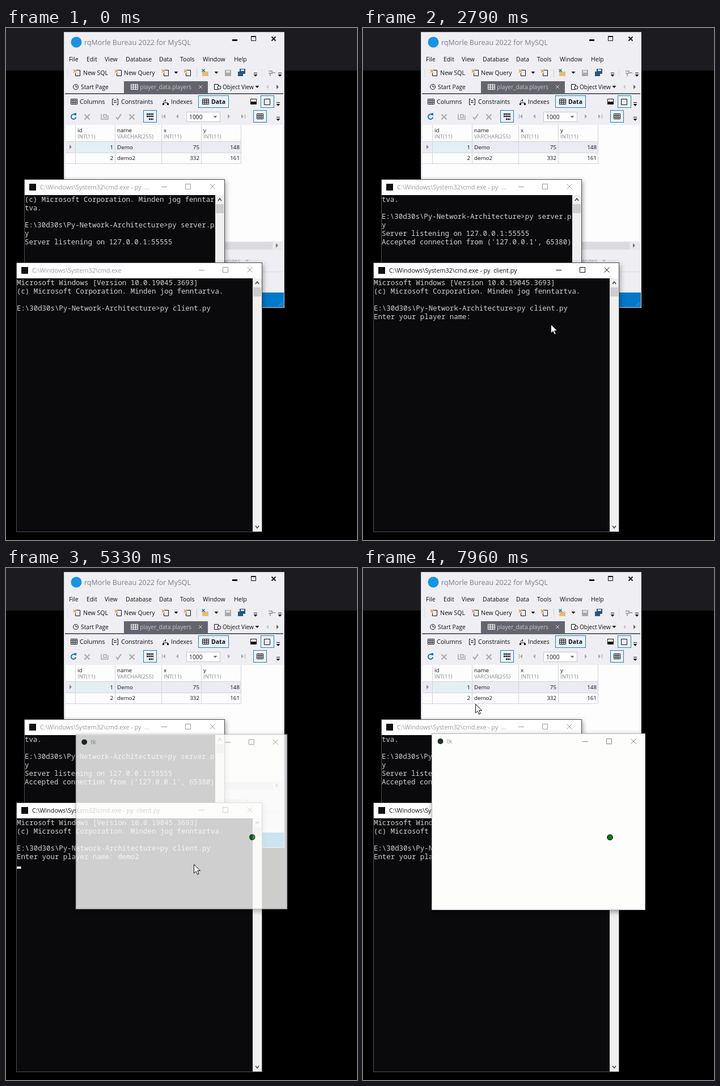
An HTML page for the animation above (8000 ms loop, 619 by 904 pixels).

```html
<!DOCTYPE html>
<html lang="en">
<head>
<meta charset="utf-8">
<title>Client and server</title>
<style>
html, body { margin: 0; width: 100%; height: 100%; overflow: hidden; background: #000; }
svg { display: block; }
text { font-family: "Open Sans", sans-serif; white-space: pre; }
.mono { font: 12.4px "Noto Sans Mono", monospace; fill: #d2d2d2; }
.shadow { filter: drop-shadow(1px 3px 5px #0006); }
</style>
</head>
<body>
<svg id="stage" width="619" height="904" viewBox="0 0 619 904"></svg>
<script>
const INK = '#111114', GREY = '#a9a9ad', BLUE = '#0a6fae', BAR = '#eeeef3', ORANGE = '#d9902a';
const CELL = 7.44;
const stage = document.getElementById('stage');

// Markup helpers
const rect = (x, y, w, h, fill, stroke) => stroke
  ? `<rect x="${x + .5}" y="${y + .5}" width="${w - 1}" height="${h - 1}" fill="${fill}" stroke="${stroke}"/>`
  : `<rect x="${x}" y="${y}" width="${w}" height="${h}" fill="${fill}"/>`;
const text = (x, y, s, size = 10.4, fill = INK, extra = '') =>
  `<text x="${x}" y="${y}" font-size="${size}" fill="${fill}" ${extra}>${s}</text>`;
const mono = (x, y, s, id = '') => `<text class="mono" x="${x}" y="${y}" ${id && `id="${id}"`}>${s}</text>`;
const line = (d, stroke = INK, w = 1, dash = 'none') =>
  `<path d="${d}" fill="none" stroke="${stroke}" stroke-width="${w}" stroke-dasharray="${dash}"/>`;
const shape = (d, fill = INK) => `<path d="${d}" fill="${fill}"/>`;
const disc = (x, y, r, fill, extra = '') => `<circle cx="${x}" cy="${y}" r="${r}" fill="${fill}" ${extra}/>`;
const down = (x, y, fill) => shape(`M${x - 3.5} ${y - 2}h7l-3.5 4z`, fill);
const side = (x, y, dir, fill = GREY) => shape(`M${x - 2 * dir} ${y - 4}v8l${4 * dir} -4z`, fill);
const cross = (x, y, r, c, w) => line(`M${x - r} ${y - r}l${2 * r} ${2 * r}m0 ${-2 * r}l${-2 * r} ${2 * r}`, c, w);
const overflow = (x, y) => rect(x - 3, y - 3, 6, 1, INK) + down(x, y + 2);
const grid = (x, y, w, h, c = INK) =>
  line(`M${x} ${y}h${w}v${h}h${-w}zM${x} ${y + h / 3}h${w}m0 ${h / 3}h${-w}M${x + w / 3} ${y}v${h}m${w / 3} 0v${-h}`, c);
const newDoc = x => line(`M${x + 5} 74.5h6.5v10h-8v-5`) + cross(x + 2.5, 76, 2.5, ORANGE, 1.3);
const chosen = (x, y, w) => rect(x, y, w, 22, '#e9f1fa', '#2b7fa2');
const grip = x => line(`M${x} 73v14`, '#b8b8c4', 1, '1 2');
const shadowed = markup => `<g class="shadow">${markup}</g>`;

function captionButtons(x, y, color) {
  return line(`M${x} ${y + .5}h10M${x + 42.5} ${y - 4.5}h9v9h-9z`, color) + cross(x + 90, y, 4.5, color);
}

function scrollbar(x, y, h) {
  const arrow = (cy, d) => line(`M${x + 5} ${cy + 2 * d}l3 ${-4 * d}l3 ${4 * d}`, '#444', 1.5);
  return rect(x, y, 16, h, '#f0f0f0') + rect(x + 1, y + 16, 14, 16, '#cdcdcd') + arrow(y + 8, 1) + arrow(y + h - 8, -1);
}

function consoleWindow(x, y, w, h, caption, name) {
  return shadowed(rect(x, y, w, h, '#0a0a0c', '#505056')) + rect(x + 1, y + 1, w - 2, 27, '#fff') +
    rect(x + 9, y + 8, 12, 12, '#111') +
    text(x + 28, y + 17.5, caption, 10.75, '#999', `id="${name}Title"`) +
    `<g id="${name}Buttons">${captionButtons(x + w - 112, y + 13, '#999')}</g>` +
    scrollbar(x + w - 17, y + 28, h - 29);
}

function databaseWindow() {
  const menu = [['File', 111], ['Edit', 142], ['View', 174], ['Database', 211], ['Data', 270],
    ['Tools', 307], ['Window', 347], ['Help', 402]];
  const columns = [['id', 'INT(11)', 123], ['name', 'VARCHAR(255)', 193], ['x', 'INT(11)', 275], ['y', 'INT(11)', 345]];
  const rows = [[1, 'Demo', 75, 148], [2, 'demo2', 332, 161]];
  const right = 'text-anchor="end"';

  const frame = rect(102, 7, 389, 487, BAR, '#d4d4e2') +
    disc(124, 25, 9.5, '#1893e2') + text(138, 29.5, 'rqMorle Bureau 2022 for MySQL', 12.5, '#808086') +
    rect(399, 20, 9, 3, INK) + line('M432.5 14.5h8v8h-8zM432 15.5h9') + cross(472, 19, 3.5, INK, 1.8) +
    menu.map(([s, x]) => text(x, 59, s, 10.5)).join('');

  const toolbar = grip(108.5) + newDoc(119) + text(136, 83, 'New SQL', 10.5) +
    newDoc(192) + text(208, 83, 'New Query', 10.5) + newDoc(275) + down(300, 79) + newDoc(314) +
    line('M336.5 72v15', '#ccccd6') +
    shape('M346 75h5l1 2h5v8h-11z', '#e5bd72') + cross(348, 75, 2.5, BLUE, 1.2) + down(371, 79) +
    shape('M386 74h11v11h-11z', GREY) + rect(388, 75, 7, 4, '#ddd') +
    shape('M412 72h10v9h-10zM409 77h9v8h-9z', '#27587e') + rect(414, 73, 6, 3, '#dde') +
    overflow(440, 82) + grip(451.5) + line('M463 76h6v4h-6m6 -1h6M466 80v5', GREY, 2) + overflow(483, 82);

  const tabs = rect(208, 94, 148, 22, '#64646e') + rect(104, 115, 385, 2, '#64646e') +
    disc(123, 104, 4.5, 'none', `stroke="${INK}"`) + line('M123 101v3h3') + text(132, 108, 'Start Page', 10.3) +
    grid(220.5, 99.5, 12, 9, '#fff') + text(236, 108, 'player_data.players', 10.05, '#c6c6ce') +
    cross(343, 104, 3, '#d2d2da') +
    line('M367.5 99.5h7v9h-7z') + disc(376, 105, 3, BAR, `stroke="${INK}"`) + text(382, 108, 'Object View', 10.05) +
    down(443, 104) + side(461, 104, -1, '#c8c8d0') + side(479, 104, 1, '#666');

  const views = grid(114.5, 125.5, 11, 9) + text(130, 134, 'Columns', 10.8) +
    line('M190 125.5h-2.5v10h2.5m5 -10h2.5v10h-2.5M190 128.5h5m0 3h-5') + text(203, 134, 'Constraints', 10.6) +
    line('M281.5 126v4m-4 5v-3h8v3m-8 -5l4 -3') + rect(276, 133, 3, 3, INK) + rect(284, 133, 3, 3, INK) +
    text(291, 134, 'Indexes', 10.5) +
    chosen(339, 119, 54) + grid(346.5, 125.5, 11, 9) + text(362, 134, 'Data', 10.5, INK, 'font-weight="700"') +
    rect(431, 125, 11, 10, '#fff', INK) + rect(431, 130, 11, 5, INK) +
    chosen(449, 119, 24) + line('M455.5 125.5h10v10h-10z') + overflow(480, 134);

  const tools = line('M122 153.5a4.3 4.3 0 1 0 1.3 4', BLUE, 1.8) + shape('M119 151l5 -1v5z', BLUE) +
    cross(143, 157, 4.5, GREY, 2) + line('M168 152v9h12v-7m-8 -1h5v5h-5z', GREY, 1.5) +
    line('M194 157l3 4l6 -9', GREY, 2) + cross(222, 157, 4.5, GREY, 2) +
    chosen(242, 145, 24) + line('M248 152h12M248 156h12M252 161h8', INK, 2.4, '2.6 .7') +
    side(279, 156, -1) + line('M275.5 152v8', GREY) + side(302, 156, -1) +
    rect(318, 148, 60, 18, '#fff', '#c6c6d0') + text(323, 160.5, '1000', 10.3) + down(369, 157, '#777') +
    side(393, 156, 1) + side(417, 156, 1) + line('M421.5 152v8', GREY) +
    chosen(436, 145, 24) + grid(442.5, 151.5, 11, 9) + overflow(480, 160);

  const table = rect(105, 171, 383, 206, '#fdfdfd') + rect(105, 200, 310, 20, '#ebebf4') + rect(123, 201, 70, 19, '#e4eff4') +
    line('M105 200.5h310M105 220.5h310M105 239.5h310' +
      [123, 193, 275, 345, 415].map(x => `M${x - .5} 171v68`).join(''), '#d3d3dd') + side(114, 210, 1, '#888') +
    columns.map(([name, type, x]) => text(x + 3, 184, name, 9.8) + text(x + 3, 195, type, 9.5, '#8a8a90')).join('') +
    rows.map(([id, name, x, y], i) => {
      const base = 213.5 + i * 19.5;
      return text(189, base, id, 9.8, INK, right) + text(196, base, name, 9.8) +
        text(341, base, x, 9.8, INK, right) + text(412, base, y, 9.8, INK, right);
    }).join('');

  const footer = rect(105, 377, 383, 15, '#e8e8ee') + rect(120, 378, 350, 13, '#dadae0') + side(478, 384, 1, '#777') +
    text(413, 415, 'Cancel Changes', 10, GREY, right) + down(425, 411, '#c4c4cc') +
    line('M105 430.5h383', '#dcdce4') + rect(103, 467, 387, 26, '#0079c9') +
    line('M488 484l-7 7m7 -3l-3 3', '#5aaee6');

  return frame + toolbar + tabs + views + tools + table + footer;
}

const PROMPT = 'E:\\30d30s\\Py-Network-Architecture&gt;py ';
const COPYRIGHT = '(c) Microsoft Corporation. Minden jog fenntar';
const CMD = 'C:\\Windows\\System32\\cmd.exe';
const serverLines = [COPYRIGHT, 'tva.', '', PROMPT + 'server.p', 'y',
  'Server listening on 127.0.0.1:55555', "Accepted connection from ('127.0.0.1', 65380)"];
const clientLines = ['Microsoft Windows [Version 10.0.19045.3693]', COPYRIGHT + 'tva.', '', PROMPT + 'client.py'];

stage.innerHTML =
  rect(0, 0, 619, 904, '#000') + rect(0, 0, 619, 75, '#1c1c20') +
  databaseWindow() +
  consoleWindow(32, 267, 354, 200, CMD + ' - py  ...', 'server') +
  '<clipPath id="serverView"><path d="M33 296h336v117h-336z"/></clipPath><g clip-path="url(#serverView)"><g id="serverText">' +
  serverLines.map((s, i) => mono(33, 307 + i * 15, s, i === 6 ? 'accepted' : '')).join('') + '</g></g>' +
  consoleWindow(18, 414, 434, 476, CMD, 'client') +
  clientLines.map((s, i) => mono(19, 454 + i * 15, s)).join('') + mono(19, 514, '', 'question') +
  '<rect id="caret" width="7.5" height="4" fill="#f2f2f2"/>' +
  `<g id="tk">${shadowed(rect(121, 292, 377, 312, '#fdfdfc', '#b4b4c0')) + disc(136.5, 306, 5, '#23302f') +
    text(148, 310, 'tk', 10.8, '#999') + captionButtons(387, 306, '#888') +
    disc(435.5, 475.5, 4.7, '#087a14', 'stroke="#0a1a0a" stroke-width="1.2"')}</g>` +
  '<path id="mouse" d="M.5 .5v15.5l3.7 -3.5l2.5 5.7l2.5 -1.1l-2.5 -5.6h5z" fill="#fff" stroke="#111"/>';

const part = Object.fromEntries([...stage.querySelectorAll('[id]')].map(e => [e.id, e]));
const show = (e, on) => e.setAttribute('visibility', on ? 'visible' : 'hidden');

const ACTIVATE = 500, LAUNCH = 1420, CONNECT = 2260, SUBMIT = 4950, OPEN = 5225;
const keyTimes = [3380, 3550, 3720, 3880, 4060];
// time, x, y
const mousePath = [[640, 300, 905], [1250, 382, 518], [1500, 382, 518], [1900, 378, 514], [2250, 378, 514],
  [2540, 331, 523], [5600, 331, 523], [5790, 340, 520], [6300, 424, 486], [6630, 418, 480],
  [7400, 215, 240], [7960, 198, 240]];

function mouseAt(t) {
  const next = mousePath.findIndex(p => p[0] > t);
  if (next < 1) return mousePath[next ? mousePath.length - 1 : 0].slice(1);
  const [a, b] = [mousePath[next - 1], mousePath[next]];
  const p = (t - a[0]) / (b[0] - a[0]), k = p * p * (3 - 2 * p);
  return [a[1] + (b[1] - a[1]) * k, a[2] + (b[2] - a[2]) * k];
}

function caretAt(t, typed) {
  if (t < LAUNCH) return [46, 3];
  if (t < CONNECT) return [0, 4];
  return t < SUBMIT ? [24 + typed, 4] : [0, 5];
}

function draw(t) {
  const typed = keyTimes.filter(k => t >= k).length;
  const active = t >= ACTIVATE, connected = t >= CONNECT;
  const captionColor = active ? '#111' : '#999';

  part.clientTitle.textContent = CMD + (t >= LAUNCH ? ' - py  client.py' : '');
  part.clientTitle.setAttribute('fill', captionColor);
  for (const icon of part.clientButtons.children) icon.setAttribute('stroke', captionColor);

  part.serverText.setAttribute('transform', `translate(0 ${connected ? -15 : 0})`);
  show(part.accepted, connected);
  part.question.textContent = connected ? 'Enter your player name: ' + 'demo2'.slice(0, typed) : '';

  const [column, row] = caretAt(t, typed);
  part.caret.setAttribute('x', 19 + column * CELL);
  part.caret.setAttribute('y', 512 + (row - 4) * 15);
  show(part.caret, active && (t < 3040 ? t < 2790 : (t - 3440 + 1060) % 1060 >= 530));

  const rest = 1 - Math.min(1, Math.max(0, (t - OPEN) / 310));
  const k = 1 - rest ** 4, scale = .95 + .05 * k;
  part.tk.setAttribute('opacity', k);
  part.tk.setAttribute('transform', `translate(309.5 448) scale(${scale}) translate(-309.5 -448)`);

  part.mouse.setAttribute('transform', `translate(${mouseAt(t).map(Math.round)})`);
}

function tick() {
  draw(performance.now() % 8000);
  requestAnimationFrame(tick);
}
tick();
</script>
</body>
</html>
```
